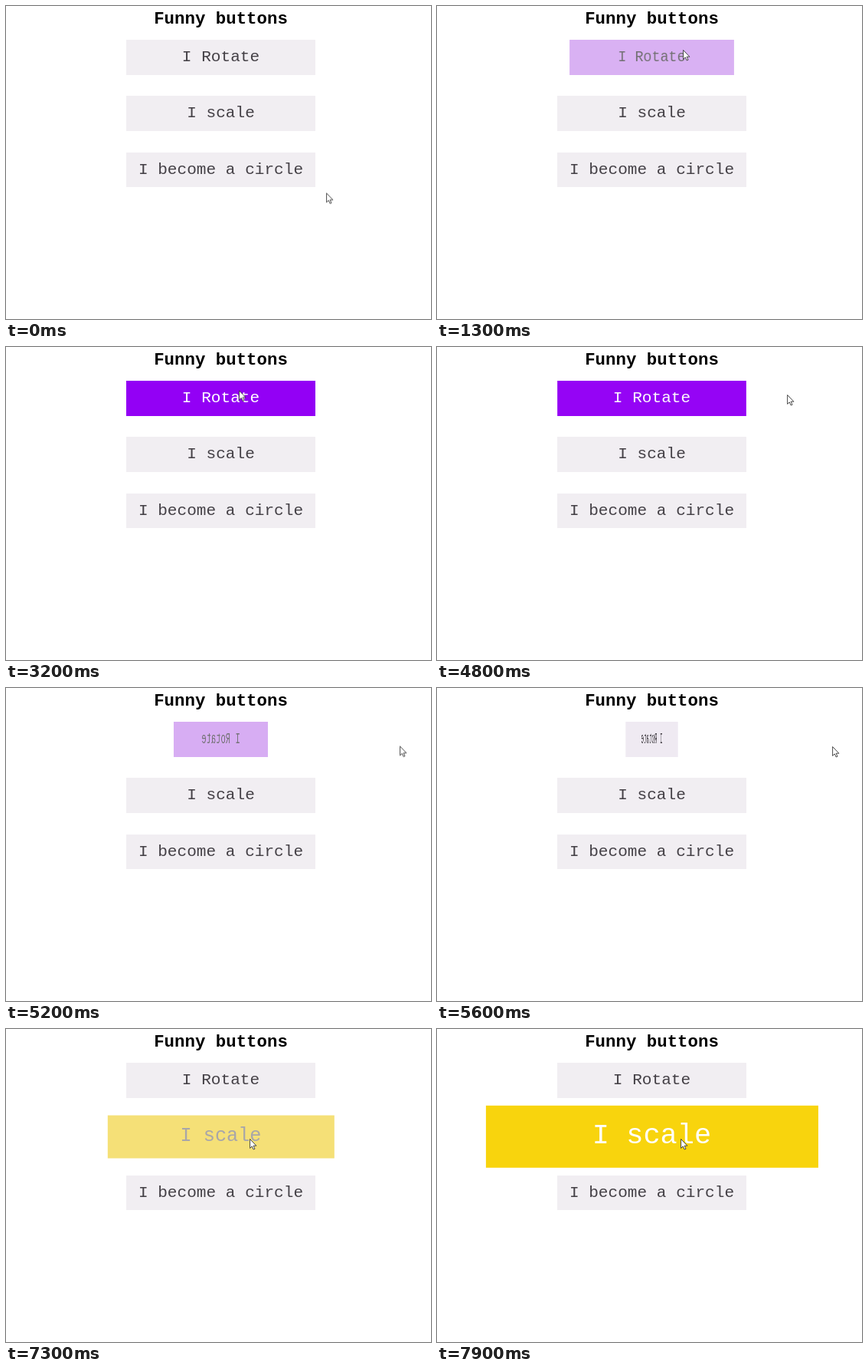
Write an HTML page that moves like this. It is 555 px wide and 408 px high and loops after 8 s.

```html
<!DOCTYPE html>
<html lang="en">
<head>
<meta charset="utf-8">
<title>Funny buttons</title>
<style>
  :root { --idle: #f1eef2; --ink: #444046; --purple: #9300f5; --gold: #f8d40c; }
  html, body { margin: 0; width: 100%; height: 100%; overflow: hidden; background: #fff; }
  body { position: relative; font-family: "Courier New", "Liberation Mono", monospace; }
  h1, .btn, .cursor { position: absolute; margin: 0; }
  h1, .btn { left: 157px; width: 247px; text-align: center; white-space: pre; }
  h1 { top: 5px; font-size: 22.4px; line-height: 24px; color: #000; }
  .btn { height: 45.6px; font-size: 21.1px; line-height: 45.6px; background: var(--idle); color: var(--ink); }

  .rotate {
    top: 43.8px;
    animation: spin 2s 1.117s ease forwards, purple 1s 1.117s ease forwards,
               unspin 2s 4.767s ease forwards, unpurple 1s 4.767s ease forwards;
  }
  .scale {
    top: 117.2px;
    animation: grow 2s 6.99s ease forwards, gold 1s 6.99s ease forwards;
  }
  .circle { top: 190.6px; }

  @keyframes spin { from { transform: rotateY(0deg); } to { transform: rotateY(360deg); } }
  @keyframes unspin { from { transform: rotateY(360deg); } to { transform: rotateY(0deg); } }
  @keyframes purple { to { background: var(--purple); color: #fff; } }
  @keyframes unpurple {
    from { background: var(--purple); color: #fff; }
    to { background: var(--idle); color: var(--ink); }
  }
  @keyframes grow { from { transform: scale(1); } to { transform: scale(2); } }
  @keyframes gold { to { background: var(--gold); color: #fff; } }

  .cursor { left: -1px; top: -.5px; overflow: visible; animation: roam 8s linear forwards; }
  @keyframes roam {
    0% { transform: translate(419px, 243.5px); }
    3.75% { transform: translate(462px, 222px); }
    7.5% { transform: translate(494px, 150px); }
    10% { transform: translate(476px, 96px); }
    11.25% { transform: translate(450px, 76px); }
    12.5% { transform: translate(420px, 66px); }
    13.75% { transform: translate(385px, 60px); }
    16.25% { transform: translate(322px, 57px); }
    18.75%, 55% { transform: translate(305px, 56.5px); }
    57.5% { transform: translate(335px, 57px); }
    58.75% { transform: translate(390px, 59px); }
    60% { transform: translate(458px, 62px); }
    61.25% { transform: translate(490px, 68px); }
    63.75% { transform: translate(513px, 75px); }
    66.25%, 77.5% { transform: translate(517px, 76px); }
    80% { transform: translate(508px, 90px); }
    82.5% { transform: translate(486px, 113px); }
    85% { transform: translate(450px, 132px); }
    87.375% { transform: translate(403px, 140px); }
    88.75% { transform: translate(345px, 143px); }
    90%, 100% { transform: translate(319px, 143px); }
  }
</style>
</head>
<body>
  <h1>Funny buttons</h1>
  <div class="btn rotate">I Rotate</div>
  <div class="btn scale">I scale</div>
  <div class="btn circle">I become a circle</div>
  <svg class="cursor" width="10" height="15">
    <path d="M.6 .5V12.4L3.2 9.9L5.2 14L7 13.2L5.1 9.2H8.9Z" fill="#fff" stroke="#2b2b2b" stroke-width=".85"/>
  </svg>
<script>
  const LOOP = 8000, STEP = 100;
  const anims = document.getAnimations();
  const start = performance.now();
  anims.forEach(a => a.pause());

  // The motion advances at ten pictures a second.
  function tick() {
    const time = (performance.now() - start) % LOOP;
    const t = Math.floor(time / STEP) * STEP;
    anims.forEach(a => { a.currentTime = t; });
    requestAnimationFrame(tick);
  }
  tick();
</script>
</body>
</html>
```
